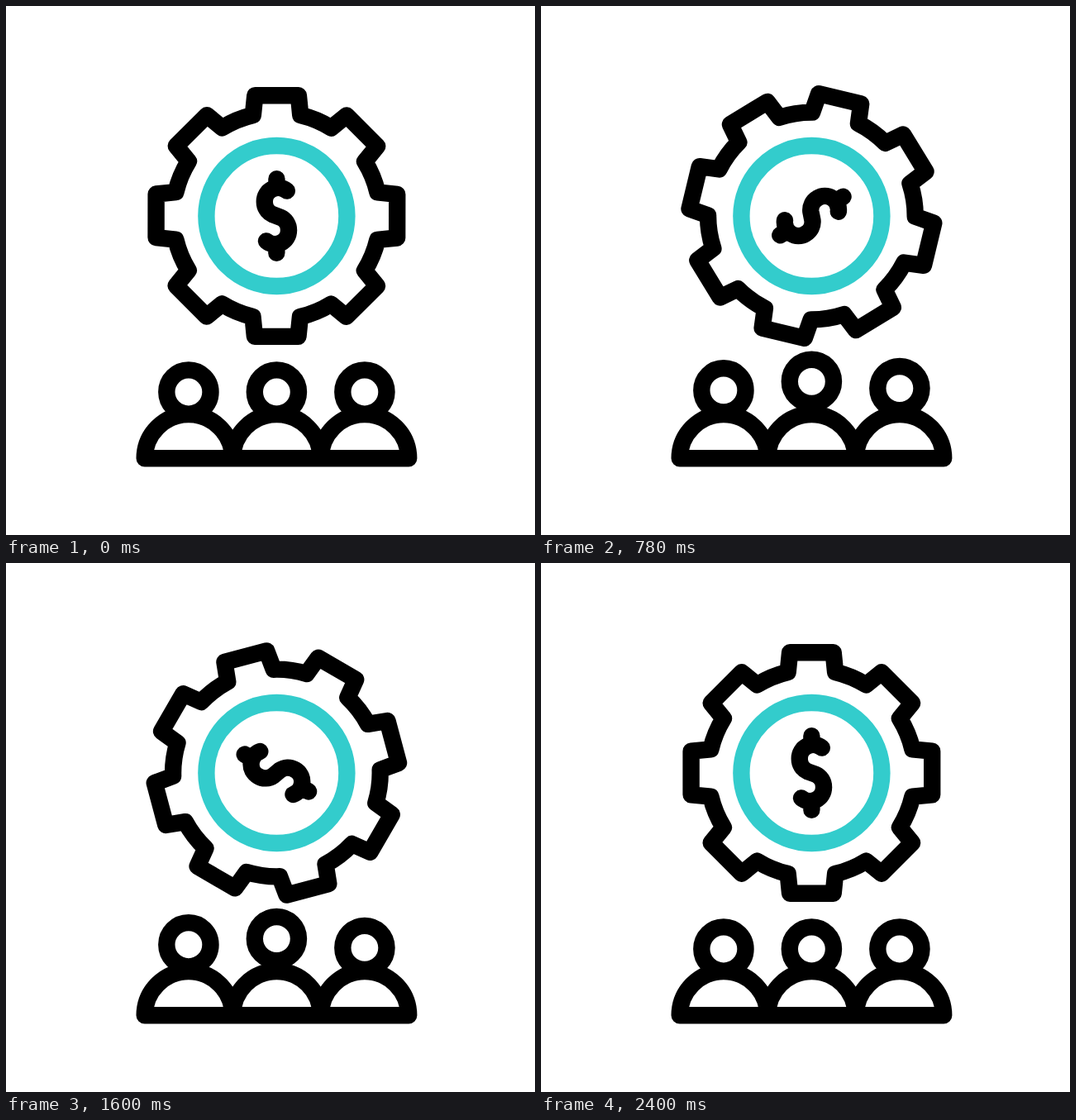
An HTML page that plays this animation: 640 by 640 pixels, repeating every 2.42 s.

```html
<!DOCTYPE html>
<html lang="en">
<head>
<meta charset="utf-8">
<title>Gear and team</title>
<style>
  html, body { margin: 0; height: 100%; overflow: hidden; background: #fff; }
  svg { display: block; width: 100%; height: 100%; }
</style>
</head>
<body>
<svg viewBox="0 0 640 640" fill="none" stroke="#000" stroke-width="20.4" stroke-linecap="round" stroke-linejoin="round">
  <g transform="translate(327.4 254)">
    <circle r="85" stroke="#3cc"/>
    <g id="spinner">
      <path id="gear"/>
      <path d="M0-44.7V-34M0 44.7V34M12.4-30.4A16.5 16.5 0 0 0-14.6-17.2A16.5 16.5 0 0 0-4.9-1.8L4.9 1.8A16.5 16.5 0 0 1 14.6 17.2A16.5 16.5 0 0 1-12.4 30.4"/>
    </g>
  </g>
  <circle class="head" cx="220.9" cy="467" r="26.6"/>
  <circle class="head" cx="327.4" cy="467" r="26.6"/>
  <circle class="head" cx="433.9" cy="467" r="26.6"/>
  <path d="M167.7 547.3a53.2 53.2 0 0 1 106.5 0a53.2 53.2 0 0 1 106.5 0a53.2 53.2 0 0 1 106.5 0z"/>
</svg>
<script>
  const LOOP = 2420, TURN = 2400;
  const BOB = 900, STAGGER = 300, LIFT = 12.8;
  const TEETH = 8, ROOT = 125.3;
  const tooth = [[-28.7, -122], [-26.3, -145.8], [26.3, -145.8], [28.7, -122]];

  const spinner = document.getElementById('spinner');
  const heads = document.querySelectorAll('.head');

  function gearPath() {
    let d = '';
    for (let i = 0; i < TEETH; i++) {
      const a = i * 2 * Math.PI / TEETH, c = Math.cos(a), s = Math.sin(a);
      tooth.forEach(([x, y], k) => {
        const join = k ? 'L' : i ? `A${ROOT} ${ROOT} 0 0 1 ` : 'M';
        d += `${join}${(x * c - y * s).toFixed(2)} ${(x * s + y * c).toFixed(2)}`;
      });
    }
    const [x, y] = tooth[0];
    return d + `A${ROOT} ${ROOT} 0 0 1 ${x} ${y}z`;
  }

  // Each head bobs twice, one after another.
  function lift(t) {
    return t > 0 && t < 2 * BOB ? LIFT * (1 - Math.cos(2 * Math.PI * t / BOB)) / 2 : 0;
  }

  function draw(now) {
    const t = now % LOOP;
    spinner.setAttribute('transform', `rotate(${180 * Math.min(t / TURN, 1)})`);
    heads.forEach((head, i) => head.setAttribute('cy', 467 - lift(t - i * STAGGER)));
  }

  function tick() {
    draw(performance.now());
    requestAnimationFrame(tick);
  }

  document.getElementById('gear').setAttribute('d', gearPath());
  tick();
</script>
</body>
</html>
```
